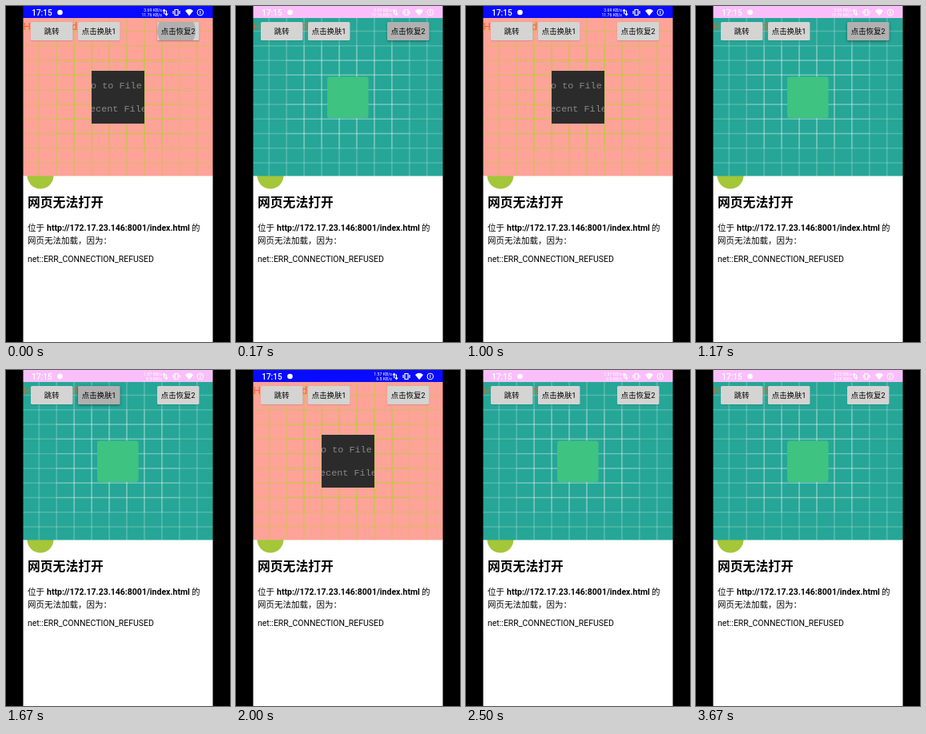
These frames come from a looping animation (280 px wide and 420 px high, 4840 ms). An HTML page with a canvas:

```html
<!DOCTYPE html>
<html lang="zh-CN">
<head>
<meta charset="utf-8">
<style>
  html, body { margin: 0; height: 100%; overflow: hidden; background: #000; }
  canvas { display: block; width: 280px; height: 420px; }
</style>
</head>
<body>
<canvas id="stage"></canvas>
<script>
const LOOP = 4840;
const LEFT = 21.5, WIDTH = 237;
const SANS = 'Roboto, "Noto Sans CJK SC", "Noto Sans CJK", sans-serif';
const MONO = '"Liberation Mono", monospace';
const canvas = document.getElementById('stage');
const ctx = canvas.getContext('2d');
const ratio = window.devicePixelRatio || 1;
canvas.width = 280 * ratio;
canvas.height = 420 * ratio;
ctx.scale(ratio, ratio);

const themes = {
  coral: { bar: '#080bff', back: '#fda398', line: 'rgba(150,225,0,.24)', hello: '#ee6530' },
  teal: { bar: '#fabffa', back: '#26a697', line: 'rgba(255,255,255,.2)', hello: '#b9783a' }
};

// Each track lists [start time, value]; values switch without easing.
const themeTrack = [[0, 'coral'], [170, 'teal'], [830, 'coral'], [1170, 'teal'], [1830, 'coral'], [2170, 'teal']];
const speedTrack = [[0, '3.69 11.76'], [330, '4.67 4.28'], [830, '3.69 11.76'], [1500, '1.57 6.5'], [3670, '4.22 4.28']];
const skinPress = [[0, 0], [670, .8], [1000, 0], [1500, .5], [1670, 1], [2000, 0]];
const resetPress = [[0, .5], [170, .8], [330, 0], [1170, 1], [1330, 0], [2170, 1], [2330, .4], [2500, 0]];
const valueAt = (track, t) => track.findLast(([start]) => start <= t)[1];

function rect(x, y, w, h, fill) {
  ctx.fillStyle = fill;
  ctx.fillRect(x, y, w, h);
}

function disc(x, y, r, fill) {
  ctx.fillStyle = fill;
  ctx.beginPath();
  ctx.arc(x, y, r, 0, 7);
  ctx.fill();
}

function box(x, y, w, h, r, fill) {
  ctx.fillStyle = fill;
  ctx.beginPath();
  ctx.roundRect(x, y, w, h, r);
  ctx.fill();
}

function text(str, x, y, size, fill = '#000', { weight = 400, family = SANS, align = 'left' } = {}) {
  ctx.font = `${weight} ${size}px ${family}`;
  ctx.textAlign = align;
  ctx.fillStyle = fill;
  ctx.fillText(str, x, y);
}

function stroke(path, width = 1) {
  ctx.strokeStyle = '#fff';
  ctx.lineWidth = width;
  ctx.stroke(new Path2D(path));
}

function statusBar(theme, speed) {
  rect(LEFT, 0, WIDTH, 15, theme.bar);
  text('17:15', 32.2, 12, 10, '#fff', { weight: 500 });
  disc(67.5, 8, 3.3, '#fff');
  speed.split(' ').forEach((n, i) =>
    text(`${n} KB/s`, 195, 7 + i * 6, 5.2, '#fff', { align: 'right' }));
  stroke('M197.7 10V4.5M196 6.4L197.7 4.4L199.4 6.4M200.5 5.5V11.5M198.8 9.6L200.5 11.6L202.2 9.6', 1.2);
  stroke('M211 4.5h4v7h-4zM209 6v4M217 6v4', 1.2);
  ctx.fillStyle = '#fff';
  ctx.fill(new Path2D('M224 6Q229 1.5 234 6L229 12.3Z'));
  stroke('M239 8a3.8 3.8 0 1 0 7.6 0a3.8 3.8 0 1 0 -7.6 0M242.8 6v4');
}

function grid(theme) {
  ctx.save();
  ctx.translate(LEFT, 15);
  ctx.scale(WIDTH / 108, 197.5 / 108);
  ctx.strokeStyle = theme.line;
  ctx.lineWidth = .8;
  const cross = (p, a, b) => {
    ctx.stroke(new Path2D(`M${p} ${a}V${b}`));
    ctx.stroke(new Path2D(`M${a} ${p}H${b}`));
  };
  for (let p = 9; p < 108; p += 10) {
    cross(p, 0, 108);
    if (p > 19 && p < 89) cross(p, 19, 89);
  }
  ctx.restore();
}

// A press spreads a grey ripple over the button and lifts its shadow.
function button(label, x, press) {
  ctx.save();
  ctx.shadowColor = `rgba(0,0,0,${.25 + .2 * press})`;
  ctx.shadowBlur = (1 + 2.5 * press ** 2) * ratio;
  ctx.shadowOffsetY = (.4 + .6 * press) * ratio;
  box(x, 20, 52.5, 23, 1.5, '#d4d4d3');
  ctx.restore();
  ctx.save();
  ctx.clip();
  disc(x + 24, 31, 48 * press, 'rgba(0,0,0,.17)');
  ctx.restore();
  text(label, x + 26.2, 35, 9.4, '#000', { align: 'center' });
}

function menuPicture() {
  ctx.save();
  ctx.beginPath();
  ctx.rect(107, 81, 66, 66);
  ctx.clip();
  rect(107, 81, 66, 66, '#2b2b2b');
  text('o to File', 106, 102.5, 11.8, '#888', { family: MONO });
  text('ecent Files', 105, 132, 11.8, '#888', { family: MONO });
  ctx.restore();
}

function errorPage() {
  rect(LEFT, 212, WIDTH, 208, '#fff');
  disc(43, 212, 16.5, '#a4c639');
  text('网页无法打开', 27, 251, 15.8, '#000', { weight: 700 });
  text('位于', 27, 281, 10.5);
  text('http://172.17.23.146:8001/index.html', 51, 281, 10.5, '#000', { weight: 700 });
  text('的', 232, 281, 10.5);
  text('网页无法加载，因为：', 27, 297, 10.5);
  text('net::ERR_CONNECTION_REFUSED', 27, 320, 10.5);
}

function draw(t) {
  const name = valueAt(themeTrack, t);
  const theme = themes[name];
  rect(0, 0, 280, 420, '#000');
  errorPage();
  rect(LEFT, 15, WIDTH, 197.5, theme.back);
  grid(theme);
  statusBar(theme, valueAt(speedTrack, t));
  text('Hello World', 21.5, 29.5, 13.2, theme.hello);
  if (name === 'coral') menuPicture();
  else box(114, 88.5, 51.5, 51.5, 3, '#3fc380');
  button('跳转', 31, 0);
  button('点击换肤1', 90, valueAt(skinPress, t));
  button('点击恢复2', 189, valueAt(resetPress, t));
}

const start = performance.now();
function tick() {
  draw((performance.now() - start) % LOOP);
  requestAnimationFrame(tick);
}
tick();
</script>
</body>
</html>
```
